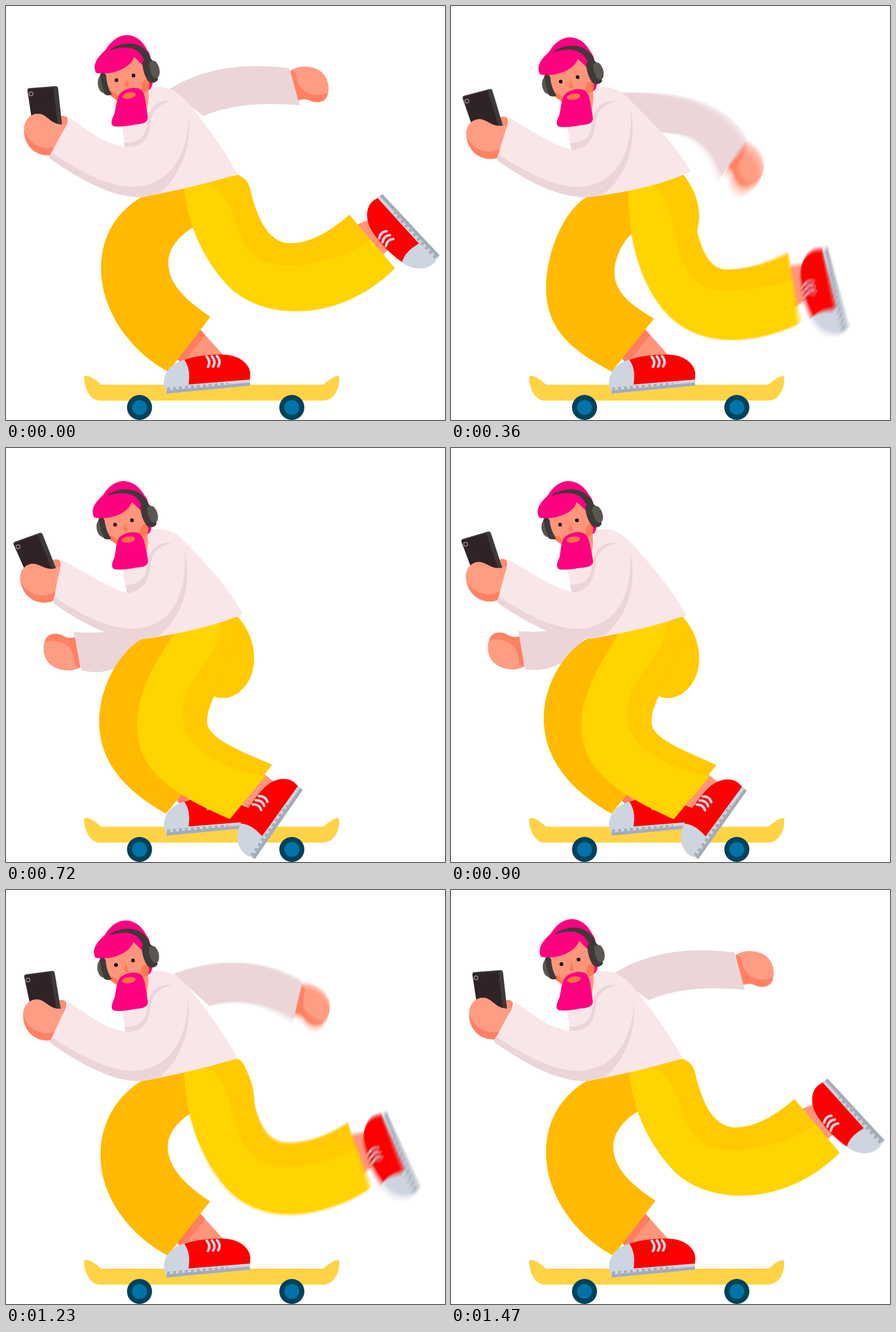
An HTML page with a canvas that plays this animation: 771x726 px, repeating every 1500 ms.

```html
<!DOCTYPE html>
<html lang="en">
<head>
<meta charset="utf-8">
<title>Skater</title>
<style>
html, body { margin: 0; width: 100%; height: 100%; overflow: hidden; background: #fff; }
canvas { display: block; width: 771px; height: 726px; }
</style>
</head>
<body>
<canvas id="stage" width="771" height="726"></canvas>
<script>
const LOOP = 1500, STEP = 30, SHUTTER = 26, SAMPLES = 12;
const W = 771, H = 726;
const PINK = '#ff0080', SKIN = '#ff957a', HAND = '#ff9d83', BLUSH = '#ff8164';
const SHIRT = '#f9e6e8', FOLD = '#ebd5d8', SUN = '#ffd400', AMBER = '#ffca00', ORANGE = '#ffba00';
const GREY = '#cdd5e0', STEEL = '#a3adb8', COAL = '#3d3a39', ASH = '#595750';

const out = document.getElementById('stage').getContext('2d');
const buf = document.createElement('canvas');
buf.width = W;
buf.height = H;
const c = buf.getContext('2d');

const nums = s => s.split(/[ ,|]+/).map(Number);

// Looping monotone cubic through keyed rows of numbers
function track(times, rows, order = times.map((_, i) => i)) {
  const data = rows.map(nums), n = times.length;
  const time = i => times[(i + n) % n] + LOOP * Math.floor(i / n);
  const row = i => data[order[(i + n) % n]];
  const slope = (i, k) => {
    const h0 = time(i) - time(i - 1), h1 = time(i + 1) - time(i);
    const d0 = (row(i)[k] - row(i - 1)[k]) / h0, d1 = (row(i + 1)[k] - row(i)[k]) / h1;
    if (d0 * d1 <= 0) return 0;
    const w0 = 2 * h1 + h0, w1 = h1 + 2 * h0;
    return (w0 + w1) / (w0 / d0 + w1 / d1);
  };
  return t => {
    let i = n - 1;
    while (times[i] > t) i--;
    const h = time(i + 1) - time(i), u = (t - time(i)) / h, u2 = u * u, u3 = u2 * u;
    return row(i).map((a, k) =>
      a + (row(i + 1)[k] - a) * (3 * u2 - 2 * u3) +
      h * (slope(i, k) * (u3 - 2 * u2 + u) + slope(i + 1, k) * (u3 - u2)));
  };
}

// Cosine swing 0 -> 1 -> 0 with its top at `peak`
const swing = (t, peak) =>
  .5 - .5 * Math.cos(Math.PI * (t < peak ? t / peak : (LOOP - t) / (LOOP - peak)));

// Leg poses: back, pushing, landed, settled, lifting, rising
const legTimes = [0, 360, 495, 540, 900, 1080, 1190, 1230];
const legOrder = [0, 1, 4, 2, 3, 4, 1, 5];
const legTrack = rows => track(legTimes, rows, legOrder);

const shin = legTrack([
  '313 318|318 380 345 440 385 485|440 550 580 562 683 460',
  '312 320|310 390 325 467 365 522|420 600 520 599 612 557',
  '298 322|268 372 235 425 235 490|235 585 330 620 402 650',
  '297 322|260 380 229 430 229 488|229 575 315 615 391 651',
  '302 320|272 375 254 430 254 485|254 590 355 625 444 648',
  '313 318|315 385 335 455 375 508|435 592 550 581 640 523']);
const calf = legTrack([
  '603 366|570 395 535 416 500 416|460 416 440 370 428 318',
  '592 433|560 448 525 462 485 462|450 462 440 421 431 391',
  '473 552|425 532 358 510 358 478|358 462 363 450 369 437',
  '466 556|410 530 352 510 352 480|352 465 357 452 364 437',
  '494 537|440 520 373 505 373 468|373 455 374 446 377 437',
  '600 408|570 428 535 443 495 443|455 443 440 400 433 355']);
const shade = legTrack([
  '641 410|595 440 545 455 497 455|375 455 430 325 340 308',
  '601 480|560 490 520 498 480 498|365 498 420 330 340 308',
  '462 574|420 568 316 540 316 470|316 390 385 370 377 300',
  '455 575|410 570 309 535 309 470|309 390 385 370 376 300',
  '483 566|430 555 331 535 331 465|331 390 390 360 371 300',
  '616 451|575 470 535 483 495 483|370 483 425 325 340 308']);
const kick = legTrack([
  '660 330 -127.7', '661 424 -98.6', '528 593 -52.6',
  '519 600 -49.2', '555 570 -64.6', '668 390 -107.6']);

// Arm poses: back, dropping, hanging, front, front high, rising
const armPose = track([0, 360, 450, 540, 900, 1080, 1172, 1230], [
  '285 147 340 112 410 98 497 109|516 174 460 170 400 170 347 193',
  '300 152 395 150 478 165 520 238|474 299 450 240 425 222 365 222',
  '325 165 372 240 380 330 350 420|280 420 300 350 290 270 260 200',
  '215 380 185 395 165 398 141 395|123 329 165 332 210 325 260 290',
  '215 365 180 387 160 392 130 388|118 321 165 325 215 318 260 290',
  '295 147 360 122 445 115 520 161|505 228 450 195 400 190 357 203'],
  [0, 1, 2, 3, 4, 2, 1, 5]);

const bodyTimes = [0, 360, 540, 900, 1080, 1230];
const hem = track(bodyTimes, ['407 295', '421 290', '419 290', '413 293', '410 294', '407 295']);
const nod = track(bodyTimes, ['0', '.57', '.95', '1', '.68', '.33']);
// Leftmost points of the standing leg, outside and inside
const knee = track(bodyTimes, ['167 460 285 450', '167 495 287 466', '165 487 287 466',
  '163 475 285 455', '165 470 285 452', '166 465 284 450']);

function fill(d, color) {
  c.fillStyle = color;
  c.fill(new Path2D(d));
}
function line(d, color, width, dash = []) {
  c.strokeStyle = color;
  c.lineWidth = width;
  c.setLineDash(dash);
  c.stroke(new Path2D(d));
}
function oval(x, y, rx, ry = rx, color = '#000', turn = 0) {
  c.fillStyle = color;
  c.beginPath();
  c.ellipse(x, y, rx, ry, turn, 0, 7);
  c.fill();
}
function group(draw) {
  c.save();
  draw();
  c.restore();
}
function turnAt(x, y, angle, px, py) {
  c.translate(x, y);
  c.rotate(angle);
  c.translate(-px, -py);
}

function board() {
  fill('M137 651C139 645 152 650 167 664H557C570 654 580 646 585 650C587 668 578 692 556 692H163C146 690 137 668 137 651Z', '#ffd345');
  for (const x of [234.5, 502]) {
    oval(x, 704, 22, 22, '#00425b');
    oval(x, 704, 13, 13, '#0074a8');
  }
}

function shoe() {
  fill('M312 621C335 612 375 609 396 613C420 619 430 635 429 648L428 659L318 668Z', '#f00');
  fill('M278 669C275 652 281 630 313 620C323 634 323 650 320 667Z', GREY);
  fill('M279 667L429 655L428 666L282 680Z', GREY);
  line('M282 677L428.5 663', STEEL, 5.5);
  line('M283 671.5L390 662.5', STEEL, 5, [5, 5.5]);
  c.lineCap = 'round';
  for (let i = 0; i < 3; i++) {
    const x = 352.5 + i * 9, y = 615 - i * .5;
    line(`M${x} ${y}Q${x + 8} ${y + 9} ${x + 2} ${y + 18}`, GREY, 4.4);
  }
  c.lineCap = 'butt';
}

function backArm(t) {
  const a = armPose(t), [x1, y1, x2, y2] = a.slice(6, 10);
  group(() => {
    turnAt(x1, y1, Math.atan2(y2 - y1, x2 - x1) - Math.atan2(65, 19), 497, 109);
    fill('M499 114C512 104 535 104 550 113C565 123 568 140 565 155C562 168 548 171 536 167C528 163 522 162 513 166Z', BLUSH);
    fill('M501 113C514 104 535 104 550 113C564 122 568 138 566 151C556 159 535 157 523 148C513 140 510 126 508 116Z', HAND);
  });
  fill(`M${a.slice(0, 2)}C${a.slice(2, 8)}L${a.slice(8, 10)}C${a.slice(10)}Z`, FOLD);
}

function standingLeg(t, q) {
  const [lx, ly, ix, iy] = knee(t);
  fill('M340 566L385 616L320 632L302 620Z', SKIN);
  fill('M340 566L350 577L309 628L300 618Z', '#ff7d60');
  fill(`M241 333C195 360 ${lx} ${ly - 58} ${lx} ${ly}C${lx} ${ly + 80} 225 610 ${285 - 4 * q} 641` +
    `L${359 - 4 * q} ${545 + 5 * q}C325 ${522 + 10 * q} ${ix} ${iy + 42} ${ix} ${iy}` +
    `C${ix} ${iy - 25} 305 402 330 ${387 + 6 * q}L345 300Z`, ORANGE);
  shoe();
}

function kickLeg(t) {
  const front = shin(t), back = calf(t), mid = shade(t), [x, y, deg] = kick(t);
  const r = deg * Math.PI / 180, cos = Math.cos(r), sin = Math.sin(r);
  const onShoe = (px, py) =>
    [x + (px - 429) * cos - (py - 665) * sin, y + (px - 429) * sin + (py - 665) * cos];
  const onHem = k => [0, 1].map(i => back[i] + (front[12 + i] - back[i]) * k);
  const curve = p => `C${p.slice(2, 8)}C${p.slice(8)}`;
  const edge = `M${front.slice(0, 2)}${curve(front)}`;

  fill('M340 310L407 296C443 335 445 395 415 423C402 437 385 441 368 437L340 400Z', AMBER);
  fill(`M${onHem(.18)}L${onShoe(407, 622)}L${onShoe(345, 620)}L${onHem(.74)}Z`, SKIN);
  fill(`${edge}L${back.slice(0, 2)}${curve(back)}Q423 302 407 296Z`, AMBER);
  fill(`${edge}L${mid.slice(0, 2)}${curve(mid)}Z`, SUN);
  group(() => {
    turnAt(x, y, r, 429, 665);
    shoe();
  });
}

function torso(t, q) {
  const [rx, ry] = hem(t), ex = 209 + 4 * q, ey = 248 + 8 * q;
  fill(`M253 144C275 139 296 145 313 163C335 187 ${rx - 32} ${ry - 57} ${rx} ${ry}` +
    `Q${rx - 67} ${316 + (rx - 407) * .45} 241 335L${ex} ${ey}L204 210L246 178Z`, SHIRT);
  fill(`M${207 + 3 * q} 240C235 240 246 228 248 205C250 180 268 162 291 167C272 170 256 182 254 205` +
    `C253 235 238 250 ${ex} ${ey}Z`, FOLD);
}

function phoneArm(q) {
  const tx = 113 - 16 * q, bx = 75 + 8 * q, by = 266 + 6 * q;
  const ex = 209 + 4 * q, ey = 247 + 8 * q;
  group(() => {
    turnAt(94 - 4.5 * q, 231 + 3.5 * q, -16 * q * Math.PI / 180, 94, 231);
    fill('M92 196C98 190 106 192 109 198L104 222L88 225Z', '#ff8d72');
    fill('M41 144L87 140.5Q91 140.5 91.5 145L98.5 209L52 207Q46 203 45 196L37.5 148Q37.5 144.5 41 144Z', COAL);
    fill('M41 146L83 143L91 209L52 207Q46 203 45 196L38.5 149Z', '#2f2325');
    c.setLineDash([]);
    c.strokeStyle = '#b5aeae';
    c.lineWidth = 1.2;
    c.beginPath();
    c.arc(44, 154, 3.4, 0, 7);
    c.stroke();
    fill('M78 262C48 264 29 240 32 213C35 193 50 186 63 190C76 196 80 207 98 208L108 200L100 230Z', BLUSH);
    fill('M32 217C34 193 50 186 63 190C76 196 80 207 98 208L106 204L90 246C65 255 40 243 32 217Z', HAND);
  });
  const low = `L241 335C190 338 130 305 ${bx} ${by}Z`;
  fill(`M${tx} 196C150 225 180 244 ${ex} ${ey}C238 ${ey + 1} 250 235 253 210L300 200L290 305${low}`, SHIRT);
  fill(`M${bx + 4} ${by - 9}C140 297 185 318 225 317C288 315 320 260 ${321 - 8 * q} ${193 - 15 * q}` +
    `C${327 + 2 * q} 245 305 302 268 329${low}`, FOLD);
}

function head(h) {
  group(() => {
    c.transform(1, 0, .045 * h, 1 - .032 * h, -8.3 * h, 8.63 * h);
    fill('M235 80L254 98L258 128C258 142 254 146 249 148L236 140Z', PINK);
    fill('M174 112L226 88L244 98L250 140C252 160 249 172 247 184L200 168C186 164 179 148 174 112Z', SKIN);
    oval(245, 140, 7, 11, '#ff7a50', .2);
    fill('M179 150C186 148 196 152 197 164C190 163 182 158 179 150Z', '#ff7a50');
    fill('M211 126C213 132 217 138 215 141C213 143 209 141 208 139C210 135 211 131 211 126Z', '#ff7a50');
    oval(194, 130, 3.2);
    oval(224, 122, 3.2);
    fill('M158 117C152 104 158 92 175 77C184 62 197 51 213 51C230 52 241 63 248 77C254 84 255 94 254 102L240 104L225 89C219 110 182 123 158 117Z', PINK);
    fill('M197 160C200 147 224 139 236 146C245 152 245 170 247 180L249 195C249 205 240 207 226 208C212 211 198 212 190 211C182 208 186 198 190 190C193 180 193 170 197 160Z', PINK);
    oval(216, 157, 12, 5.5, '#ff7048', -.15);
    fill('M181 78C202 61 244 58 256 96L244 100C236 71 212 68 181 78Z', COAL);
    fill('M240 97C247 90 257 92 259 98L267 128C265 135 254 137 249 131C243 122 239 108 240 97Z', COAL);
    fill('M252 99C257 95 262 95 265 100C270 107 271 116 269 122C267 127 261 128 258 124C254 117 251 108 252 99Z', ASH);
    fill('M166 119C171 116 175 118 176 122C177 136 181 147 186 155C181 158 174 157 171 152L163 128Z', COAL);
    fill('M164 124C161 128 160 137 163 144C165 150 169 153 173 152C169 143 167 133 166 123Z', ASH);
  });
}

function scene(t) {
  const q = swing(t, 600);
  c.fillStyle = '#fff';
  c.fillRect(0, 0, W, H);
  backArm(t);
  board();
  standingLeg(t, q);
  kickLeg(t);
  torso(t, q);
  phoneArm(q);
  head(nod(t)[0]);
}

// Average several moments inside the shutter for motion blur
function render(t) {
  for (let i = 0; i < SAMPLES; i++) {
    const s = t + ((i + .5) / SAMPLES - .5) * SHUTTER;
    scene((s + LOOP) % LOOP);
    out.globalAlpha = 1 / (i + 1);
    out.drawImage(buf, 0, 0);
  }
}

const start = performance.now();
let shown = -1;
function tick() {
  const t = Math.floor(((performance.now() - start) % LOOP) / STEP) * STEP;
  if (t !== shown) render(shown = t);
  requestAnimationFrame(tick);
}
tick();
</script>
</body>
</html>
```
